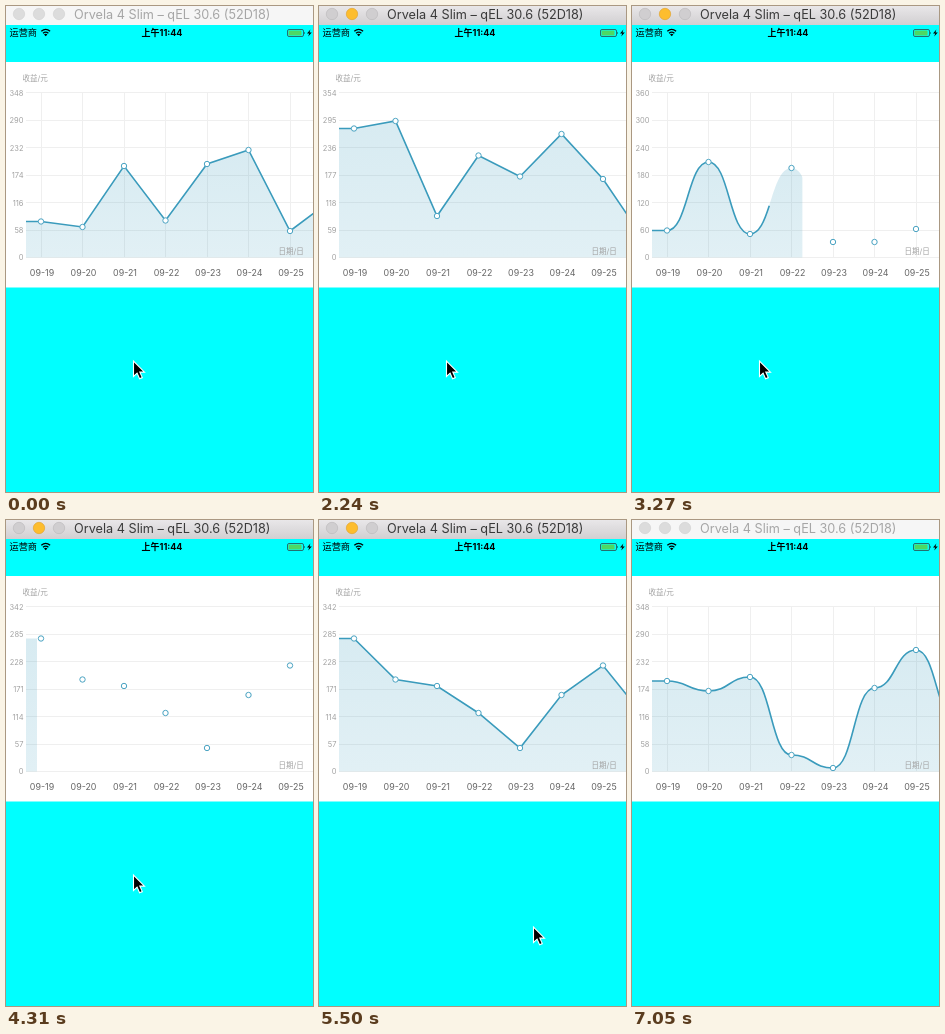
Recreate the animation shown at these times as an HTML page. Size 307 by 486 pixels, loop 7150 ms.

```html
<!DOCTYPE html>
<html lang="zh">
<head>
<meta charset="utf-8">
<style>
  html, body { margin: 0; height: 100%; overflow: hidden; background: #0ff; }
  svg { display: block; width: 100vw; height: 100vh; font-family: Inter, "Noto Sans CJK SC", "Noto Sans CJK", sans-serif; }
  .axis { font-size: 7.5px; fill: #a2a2a2; }
  .day { font-size: 8.9px; fill: #666; text-anchor: middle; }
  .grid { stroke: #efefef; fill: none; }
</style>
</head>
<body>
<svg viewBox="0 0 307 486">
  <defs>
    <linearGradient id="bar" x2="0" y2="1">
      <stop stop-color="#e9e7e9"/><stop offset="1" stop-color="#d1cfd1"/>
    </linearGradient>
    <linearGradient id="shade" x2="0" y2="1">
      <stop stop-color="#3a9bbc" stop-opacity=".2"/><stop offset="1" stop-color="#3a9bbc" stop-opacity=".15"/>
    </linearGradient>
    <clipPath id="reveal"><rect id="window" x="20" y="80" width="0" height="172"/></clipPath>
  </defs>

  <rect width="307" height="486" fill="#0ff"/>
  <rect id="titleBar" width="307" height="19"/>
  <g id="buttons"></g>
  <text id="title" x="68" y="13" font-size="12.7">Orvela 4 Slim – qEL 30.6 (52D18)</text>

  <text x="3.5" y="30.3" font-size="9.2">运营商</text>
  <g fill="none" stroke="#000" stroke-width="1.3">
    <path d="M35.3 25.3Q39.7 21.4 44.1 25.3M37 27.2Q39.7 24.9 42.4 27.2"/>
  </g>
  <path d="M38 28.4Q39.7 27 41.4 28.4L39.7 30.2Z"/>
  <text x="156" y="30.3" font-size="9" font-weight="700" text-anchor="middle">上午11:44</text>
  <rect x="281.5" y="23.5" width="16" height="7" rx="1.5" fill="none" stroke="#333" stroke-width=".7"/>
  <rect x="282.5" y="24.5" width="13" height="5" rx=".6" fill="#4cd964"/>
  <path d="M298.4 25.8q1.2 1.2 0 2.4z"/>
  <path d="M304.4 23.4L301 27.5H303.2L302.2 30.6L305.8 26.4H303.5Z"/>

  <rect y="56" width="307" height="225.5" fill="#fff"/>
  <path id="rows" class="grid"/>
  <path id="columns" class="grid"/>
  <text class="axis" x="16.5" y="74.6">收益/元</text>
  <g id="labels"></g>
  <path id="area" fill="url(#shade)" clip-path="url(#reveal)"/>
  <path id="line" fill="none" stroke="#3a9bbc" stroke-width="1.6" pathLength="1"/>
  <rect x="0" y="80" width="20" height="0"/>
  <g id="dots" fill="#fff" stroke="#4aa3c2"></g>
  <text class="axis" x="272.5" y="248.2">日期/日</text>
  <path id="cursor" d="M0 0V15.4L3.6 12.1L6.1 17.8L8.8 16.6L6.3 11.1H11Z" stroke="#fff" stroke-width="1.1"/>
</svg>
<script>
const LOOP = 7150, LEFT = 20, BASE = 251.5, STEP = 27.45, DRAW = 820, LINE_DELAY = 120;
const $ = id => document.getElementById(id);
const px = i => 35 + 41.5 * i;

// at: when the chart replaces the last one; begin: when its drawing started
const charts = [
  { at: 0, begin: -2000, max: 348, columns: true, ys: [215.5, 221, 160, 214.5, 158, 144, 225, 194] },
  { at: 1500, begin: 1416, max: 354, ys: [122.5, 115, 210, 149.5, 170.5, 128, 173, 234] },
  { at: 2690, begin: 2716, max: 360, columns: true, curved: true, ys: [224.5, 156, 228, 162, 236, 236, 223, 240] },
  { at: 4310, begin: 4190, max: 342, ys: [118.5, 159.5, 166, 193, 228, 175, 145.5, 197] },
  { at: 5800, begin: 5715, max: 348, columns: true, curved: true, ys: [161, 171, 157, 235, 248, 168, 130, 204] }
];

// The screen refreshes in steps: [from, to, intervals]
const bursts = [[1500, 2240, 5], [2690, 3570, 6], [4310, 5500, 8], [5800, 6540, 5]];

const pointer = [
  [0, 127.5, 355], [4460, 127.5, 355], [4900, 190, 450], [5050, 215, 470], [5350, 222, 423],
  [5500, 214.5, 407], [5800, 214.5, 407], [5950, 226, 418], [6250, 312, 400], [LOOP, 312, 400]
];

function held(t) {
  for (const [from, to, n] of bursts) {
    if (t >= from && t < to) {
      const d = (to - from) / n;
      return from + Math.floor((t - from) / d + 0.1) * d;
    }
  }
  return t;
}

function trace({ ys, curved }) {
  let d = `M${LEFT} ${ys[0]}H${px(0)}`;
  for (let i = 1; i < ys.length; i++) {
    const mid = (px(i) + px(i - 1)) / 2;
    d += curved ? `C${mid} ${ys[i - 1]} ${mid} ${ys[i]} ${px(i)} ${ys[i]}` : `L${px(i)} ${ys[i]}`;
  }
  return d;
}

const grow = (ms, span) => Math.min(1, Math.max(0, ms / span)) ** 1.7;

let shown;
function showChart(chart) {
  if (chart === shown) return;
  shown = chart;
  const d = trace(chart);
  $('line').setAttribute('d', d);
  $('area').setAttribute('d', `${d}V${BASE}H${LEFT}Z`);
  $('columns').style.display = chart.columns ? '' : 'none';
  $('dots').innerHTML = chart.ys.slice(0, 7).map((y, i) => `<circle cx="${px(i)}" cy="${y}" r="2.7"/>`).join('');
  ticks.forEach((tick, i) => tick.textContent = chart.max / 6 * i);
}

function showTitle(active) {
  $('titleBar').setAttribute('fill', active ? 'url(#bar)' : '#f6f6f6');
  $('title').setAttribute('fill', active ? '#3a3a3a' : '#a6a6a6');
  [...$('buttons').children].forEach((b, i) => {
    b.setAttribute('fill', !active ? '#dcdcdc' : i === 1 ? '#fdbd2e' : '#d0ced0');
    b.setAttribute('stroke', !active ? '#d0d0d0' : i === 1 ? '#e0a028' : '#b9b7b9');
  });
}

function showPointer(t) {
  const i = pointer.findIndex(p => p[0] > t);
  const [t0, x0, y0] = pointer[i - 1], [t1, x1, y1] = pointer[i];
  const k = (t - t0) / (t1 - t0);
  $('cursor').setAttribute('transform', `translate(${x0 + (x1 - x0) * k} ${y0 + (y1 - y0) * k})`);
}

function frame() {
  const now = performance.now() % LOOP, t = held(now);
  const chart = charts.findLast(c => now >= c.at);
  showChart(chart);
  showTitle(now >= 1500 && now < 7050);
  showPointer(t);
  const age = t - chart.begin;
  const drawn = grow(age - LINE_DELAY, DRAW - LINE_DELAY);
  $('window').setAttribute('width', 287 * grow(age, DRAW));
  $('line').style.visibility = drawn ? 'visible' : 'hidden';
  $('line').setAttribute('stroke-dasharray', drawn < 1 ? `${drawn} 2` : 'none');
  requestAnimationFrame(frame);
}

const rowY = i => BASE - STEP * i;
const seven = [...Array(7).keys()];
$('buttons').innerHTML = [13, 33, 53].map(x => `<circle cx="${x}" cy="8" r="5.7" stroke-width=".6"/>`).join('');
$('rows').setAttribute('d', seven.map(i => `M${LEFT} ${Math.floor(rowY(i)) + .5}H307`).join(''));
$('columns').setAttribute('d', seven.map(i => `M${Math.floor(px(i)) + .5} 87V${BASE}`).join(''));
$('labels').innerHTML =
  seven.map(i => `<text class="axis tick" x="17.5" y="${rowY(i) + 2.9}" text-anchor="end"></text>`).join('') +
  seven.map(i => `<text class="day" x="${px(i) + 1}" y="270">09-${19 + i}</text>`).join('');
const ticks = document.querySelectorAll('.tick');
frame();
</script>
</body>
</html>
```
